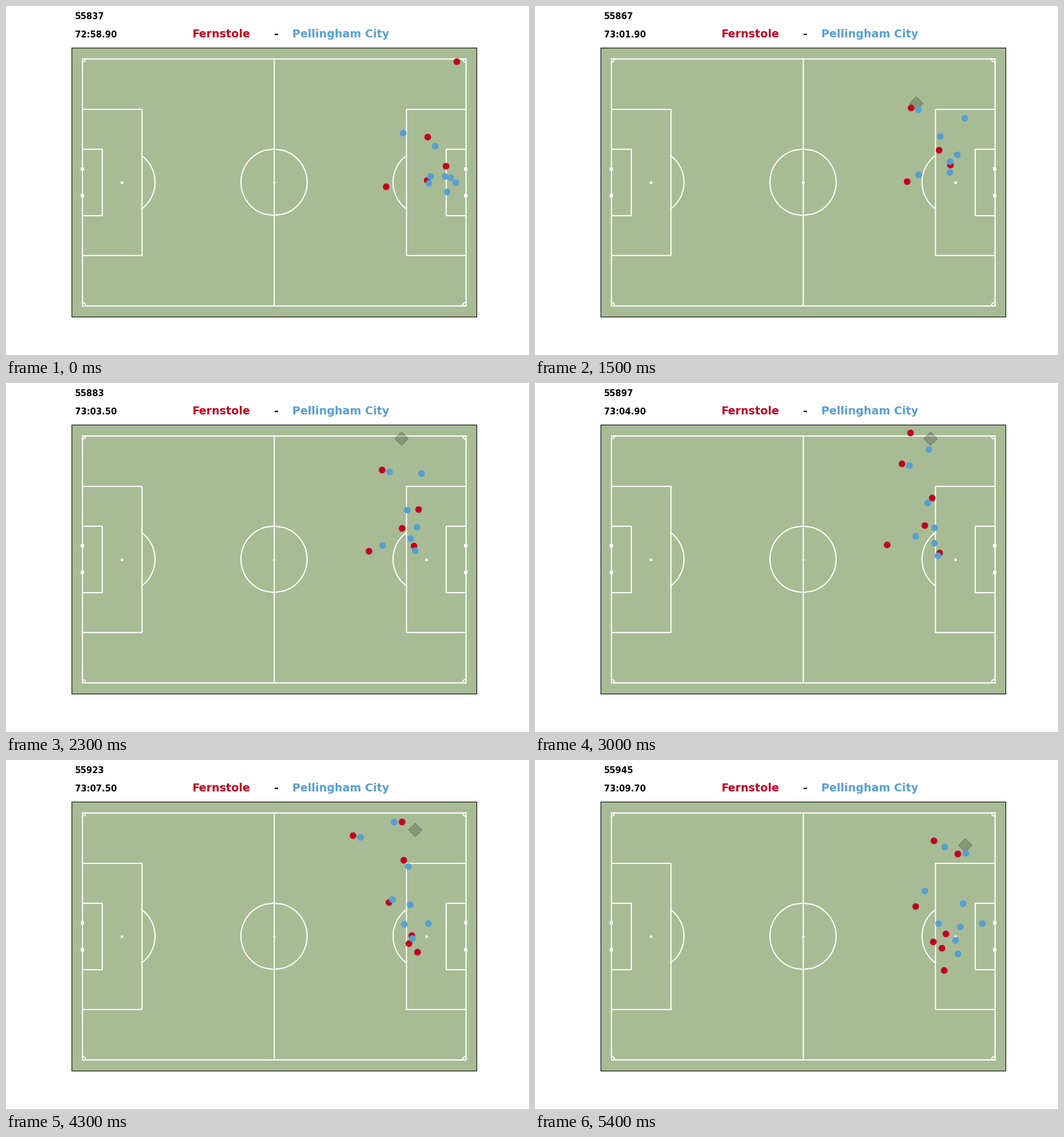
A matplotlib script that plays this animation: 917x611 px, repeating every 5.5 s.

```python
import numpy as np
import matplotlib.pyplot as plt
from matplotlib.animation import FuncAnimation
from matplotlib.transforms import Affine2D

W, H, DPI = 917, 611, 100
SCALE = W / 1200  # line, marker and font sizes are for a 12 inch figure
FRAMES, INTERVAL = 55, 100
LAST = FRAMES - 1
GRASS, RED, BLUE = "#a7bb95", "#c00020", "#589fd2"
HALF_X, HALF_Y, BORDER = 53, 34, 3
YARD = 0.9144

plt.rcParams["font.family"] = "DejaVu Sans"
fig = plt.figure(figsize=(W / DPI, H / DPI), dpi=DPI, facecolor="white")
ax = fig.add_axes([0.125, 0.11, 0.775, 0.77], facecolor=GRASS)
ax.set_xlim(-HALF_X - BORDER, HALF_X + BORDER)
ax.set_ylim(-HALF_Y - BORDER, HALF_Y + BORDER)
ax.set_xticks([])
ax.set_yticks([])


def to_pitch(p):
    """Stage pixels (y down) to metres from the centre spot."""
    x = (p[:, 0] - 0.5125 * W) * 2 * (HALF_X + BORDER) / (0.775 * W)
    y = (0.505 * H - p[:, 1]) * 2 * (HALF_Y + BORDER) / (0.77 * H)
    return np.column_stack([x, y])


# ---- pitch markings ----
def curve(x, y, **style):
    ax.plot(x, y, color="white", lw=2 * SCALE, zorder=1, snap=False, **style)


def line(x, y):
    # straight lines sit on pixel centres
    nudge = Affine2D().translate(SCALE / 2, -SCALE / 2)
    curve(x, y, transform=ax.transData + nudge)


def mark(x, y, shape, size):
    ax.plot([x], [y], shape, color="white", ms=size * SCALE, mew=0, zorder=1)


def draw_pitch():
    line([0, 0], [-HALF_Y, HALF_Y])
    mark(0, 0, "o", 4.6)
    sweep = np.linspace(-1, 1, 50)
    radius = 10 * YARD
    for s in (-1, 1):
        end = s * HALF_X
        line([-HALF_X, HALF_X], [s * HALF_Y] * 2)
        line([end, end], [-HALF_Y, HALF_Y])
        y = sweep * radius
        curve(s * np.sqrt(radius**2 - y**2), y)
        # penalty area and goal area
        for depth, half in ((18 * YARD, 22 * YARD), (6 * YARD, 10 * YARD)):
            inner = end - s * depth
            line([end, inner, inner, end], [-half, -half, half, half])
        spot = end - s * 12 * YARD
        mark(spot, 0, "o", 4.6)
        y = sweep * 8 * YARD
        curve(spot - s * np.sqrt(radius**2 - y**2), y)
        y = np.linspace(0, 1, 50) * YARD
        x = end - s * np.sqrt(YARD**2 - y**2)
        for t in (-1, 1):
            mark(end, t * 4 * YARD, "s", 6.5)
            curve(x, t * (HALF_Y - y))


draw_pitch()

# ---- players: smooth runs through evenly timed points ----
teams = {RED: [[] for _ in range(FRAMES)], BLUE: [[] for _ in range(FRAMES)]}


def smooth(u, pts):
    """Cubic Hermite curve; u counts waypoints from 0."""
    slope = np.gradient(pts, axis=0)
    i = np.minimum(u.astype(int), len(pts) - 2)
    v = (u - i)[:, None]
    return ((1 + 2 * v) * (1 - v)**2 * pts[i] + v * (1 - v)**2 * slope[i]
            + v**2 * (3 - 2 * v) * pts[i + 1] + v**2 * (v - 1) * slope[i + 1])


def run(team, first, last, *pts):
    """Add a player in view from step first to step last."""
    u = np.linspace(0, len(pts) - 1, last - first + 1)
    path = to_pitch(smooth(u, np.array(pts, float)))
    for n, p in enumerate(path, first):
        teams[team][n].append(p)


# in view for the whole move
run(RED, 0, LAST, (739, 229), (703, 254), (676, 247), (667, 256))
run(RED, 0, LAST, (771, 280), (722, 279), (708, 305), (720, 304))
run(BLUE, 0, LAST, (696, 222), (710, 227), (685, 199), (755, 163))
run(BLUE, 0, LAST, (752, 245), (748, 184), (671, 97), (718, 152))
run(BLUE, 0, LAST, (769, 298), (734, 255), (693, 254), (750, 251))
run(BLUE, 0, LAST, (779, 300), (719, 270), (696, 286), (707, 286))
run(BLUE, 0, LAST, (744, 298), (664, 292), (673, 255), (683, 229))
run(BLUE, 0, LAST, (741, 310), (724, 290), (703, 309), (737, 315))

# corner kick: lost when the view moves upfield
run(RED, 0, 11, (790, 97), (790, 98))
run(RED, 0, 13, (738, 305), (751, 342))
run(RED, 3, 12, (764, 250), (778, 241))
run(RED, 2, 12, (766, 304), (781, 299))
run(RED, 4, 13, (784, 307), (783, 338))
run(BLUE, 0, 13, (788, 309), (778, 295))
run(BLUE, 0, 13, (773, 325), (773, 328))

# clearance and throw-in, with one marker shadowing the wide player
wide = np.array([(655, 194), (661, 155), (637, 139), (608, 132)])
run(RED, 11, 43, *wide)
run(BLUE, 11, 43, *(wide + (13, 3)))
run(RED, 0, 41, (666, 316), (654, 309), (625, 287), (580, 267))
run(RED, 19, LAST, (737, 232), (684, 185), (741, 164))
run(RED, 29, LAST, (655, 86), (692, 104), (699, 141))
run(RED, 33, LAST, (662, 316), (707, 321), (698, 318))

# second attack: the view returns to the penalty area
run(RED, 41, LAST, (722, 337), (713, 329))
run(RED, 44, LAST, (719, 370), (717, 368))
run(BLUE, 44, LAST, (780, 299), (784, 286))
run(BLUE, 43, LAST, (740, 286), (745, 292))
run(BLUE, 44, LAST, (733, 339), (741, 339))

# ---- ball: straight flights between touches (step, x, y) ----
touches = np.array([(8, 768, 162), (11, 752, 262), (15, 668, 170), (23, 693, 96.5),
                    (39, 693, 96.5), (47, 740, 147), (54, 754, 148.5)])
kick, *flight = touches.T
ball_path = to_pitch(np.column_stack(
    [np.interp(np.arange(FRAMES), kick, f) for f in flight]))

ball, = ax.plot([], [], "D", color="black", ms=16 * SCALE, mew=SCALE, alpha=0.2, zorder=3)
dots = {c: ax.plot([], [], "o", color=c, ms=10 * SCALE, mew=SCALE, zorder=z)[0]
        for c, z in ((RED, 4), (BLUE, 5))}


# ---- captions ----
def caption(x, y, text, size, color="black"):
    return ax.text(x, y, text, fontsize=size * SCALE, color=color, weight="bold")


counter = caption(-55, 44.9, "", 14)
clock = caption(-55, 39.9, "", 14)
caption(-22.7, 39.9, "Fernstole", 18, RED)
caption(0, 39.9, "-", 18)
caption(5, 39.9, "Pellingham City", 18, BLUE)


def update(n):
    counter.set_text(str(55837 + 2 * n))
    tenths = 43789 + 2 * n
    clock.set_text(f"{tenths // 600}:{tenths % 600 / 10:05.2f}")
    for color, dot in dots.items():
        dot.set_data(*np.array(teams[color][n]).T)
    ball.set_data(*ball_path[n:n + 1].T)
    ball.set_visible(n >= kick[0])
    return [counter, clock, ball, *dots.values()]


anim = FuncAnimation(fig, update, frames=FRAMES, interval=INTERVAL,
                     repeat=True, repeat_delay=0, blit=False)
plt.show()
```
